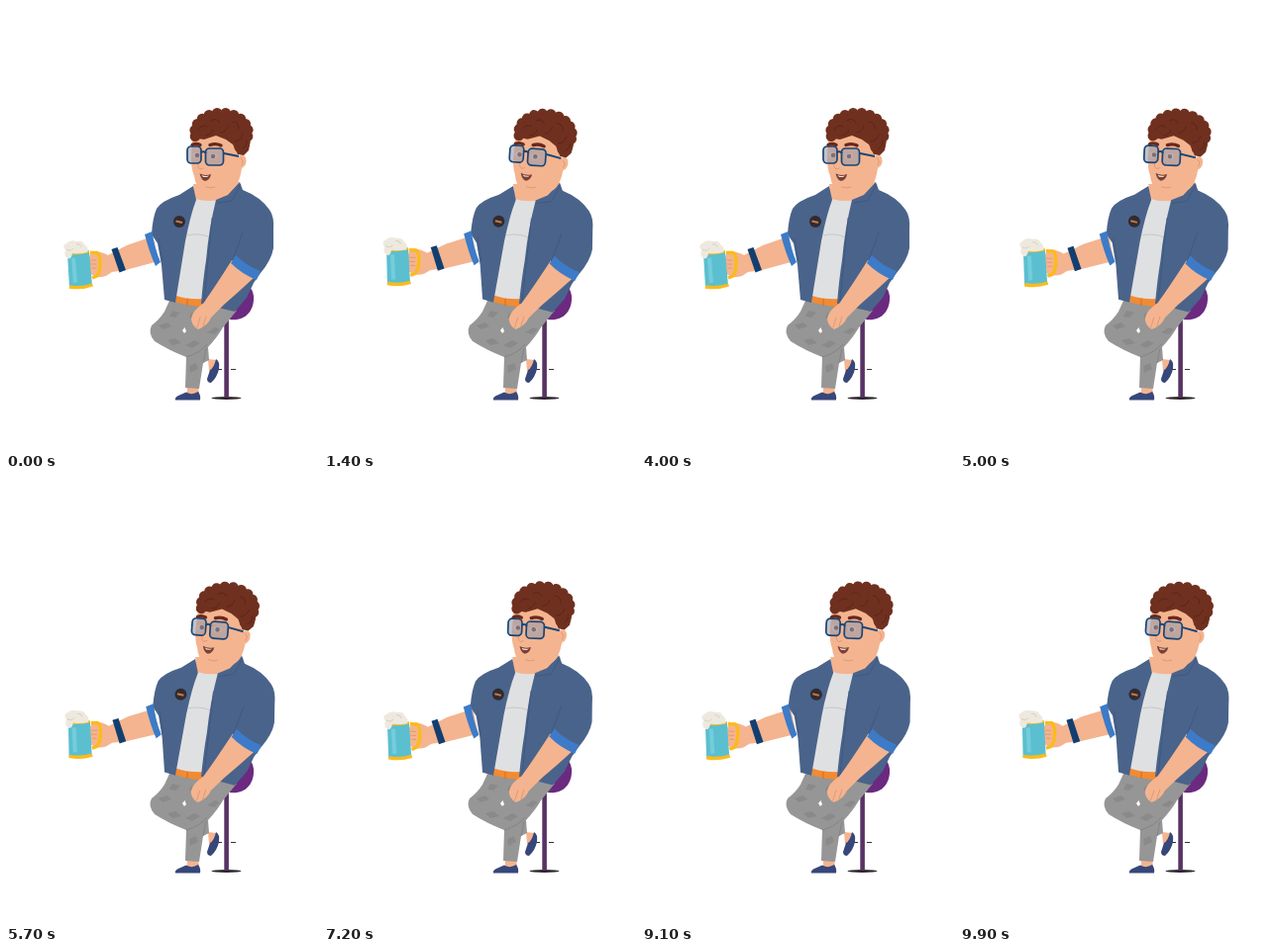
An HTML page that plays this animation: 315 px wide and 450 px high, repeating every 10000 ms.

```html
<!DOCTYPE html>
<html lang="en">
<head>
<meta charset="utf-8">
<title>Man raising a mug</title>
<style>
  html, body { margin: 0; width: 100%; height: 100%; overflow: hidden; background: #fff; }
  svg { display: block; width: 315px; height: 450px; }
  .skin { fill: #f4b48f; }
  .shade { fill: none; stroke: #d9946f; stroke-width: .8; stroke-linecap: round; }
  .denim { fill: #4a638a; }
  .seam { fill: none; stroke: #3b547d; stroke-width: .7; }
  .cuff { fill: #3d7bc8; }
  .navy { fill: #123f70; }
  .shoe { fill: #37477a; }
  .gray { fill: #969696; }
  .purple { fill: #6b2a80; }
  .hair { fill: #70301f; }
  .curl { fill: none; stroke: #572317; stroke-width: .8; stroke-linecap: round; }
  .brow { fill: none; stroke: #6a291c; stroke-width: 3.4; stroke-linecap: round; }
  .rim { fill: #a09ca8a0; stroke: #174679; stroke-width: 1.7; }
  .gold { fill: none; stroke: #fbbb1c; stroke-width: 3.4; stroke-linejoin: round; }
</style>
</head>
<body>
<svg viewBox="0 0 315 450">
  <g id="stool">
    <ellipse cx="222.500" cy="396.500" rx="15" ry="1.500" fill="#292329"/>
    <path d="M213 367.500H218M227 367.500H232" stroke="#38303a" stroke-width="1.200"/>
    <path d="M220.300 310h4.600v86h-4.600z" fill="#573263"/>
    <path class="purple" d="M226 317C241 319 251 309 250 293Q249 285 244 284L226 302Z"/>
  </g>

  <g id="legs">
    <path class="skin" d="M204 357l8 1-1 10-6 1zM183 384h11l1 8h-12z"/>
    <path class="shoe" d="M212 357Q216 359 215 367 213 376 207 381 203 381 203 377L206 368Q210 366 212 357ZM182 390.500Q188 394 194 390 197 394 196 398.500H171Q170 396 174 394Z"/>
    <path class="gray" d="M165 298L160 309Q155 317 147 323 143 331 150 339 164 348 182 355L181 386 195 387 199 361 205 358 204 345Q214 334 219 325L233 308 198 297Z"/>
    <g fill="#8a8a8a">
      <path d="M168 308l8 2-5 5-6-1zM154 323l9-3 4 4-9 3zM163 338l8-2 6 5-9 2zM181 343l9-5 6 3-8 5zM203 330l8-5 5 2-6 5zM185 364l7-3 2 6-8 4zM187 310l5 2-2 6-5-3z"/>
    </g>
    <path d="M182 355Q196 351 203 342M199 361L202 346" fill="none" stroke="#7f7f7f" stroke-width=".8"/>
    <path d="M178 328l2.500-3 1.500 4-2 2z" fill="#fff"/>
  </g>

  <g id="torso">
    <g id="arm">
      <path class="skin" d="M148 233L122 242 103 252Q95 247 86 249L83 257 85 271Q92 276 101 273L107 269 121 267 154 258Z"/>
      <path class="navy" d="M106.500 246L112.500 244 121 267 114.500 269.500Z"/>
      <path d="M62 250L84 248 87 283Q76 287 64 285Z" fill="#5bbfd0"/>
      <path d="M66 255l4-.4 2 25-4 .4z" fill="#74cdda"/>
      <path class="gold" d="M85 249.500L92 249.500Q95 251 95 260T92 273L87 275"/>
      <path class="gold" d="M64 284Q76 286 87.500 282"/>
      <path class="gold" d="M62 250Q74 251 84 248" style="stroke-width:2.400"/>
      <path class="skin" d="M85 253h6q2 2 0 4 2 2 0 4 2 2 0 4 1 3-3 5l-2 0z"/>
      <path class="shade" d="M86 257h5M86 261h5M87 265h4"/>
      <path d="M62 255Q58 252 60 247 56 242 61 240 65 236 71 238 78 237 79 241 84 244 82 249 75 251 67 250 66 257 62 255Z" fill="#eee9df"/>
      <path d="M61 246q4 3 7-1m3-4q4-1 5 3" fill="none" stroke="#d9d0c1"/>
    </g>
    <path d="M188 192L215 190 208 230 199 302 170 297 178 230Z" fill="#dfe0e1"/>
    <path d="M183 232Q195 229 206 234" fill="none" stroke="#c5c7ca"/>
    <path d="M172 293Q184 297 199 296L198 304Q182 303 170 299Z" fill="#f28a32"/>
    <path d="M183 296v7" stroke="#d36d20"/>
    <path class="skin" d="M189 180L236 178 226 193Q207 200 191 195Z"/>
    <path class="denim" d="M189 182L192 196Q186 212 181 238L171 300 160 297 157 262 153 240 147 231Q148 214 152 205 157 197 175 191Z"/>
    <path class="denim" d="M212 196L224 191 236 178 239 186Q257 193 266 206 271 213 270 226V245Q268 257 257 270L250 280 243 295 231 309 197 301Q199 276 202 257 205 224 212 196Z"/>
    <path class="seam" d="M237 180L228 197 213 199M239 229L229 257M154 235L158 258M208 214L200 299"/>
    <path class="cuff" d="M140 231L147.500 228Q150 245 156 259L151 263Q145 250 140 231Z"/>
    <path class="skin" d="M228 257L251 274Q235 289 220 302L207 315Q204 323 194 327 187 323 187 316 189 307 199 301 211 284 228 257Z"/>
    <path class="shade" d="M193 325L196 315M199 324L202 314"/>
    <path class="cuff" d="M232 252Q243 263 257 268L253 277Q238 271 227 260Z"/>
    <circle cx="175" cy="218" r="6" fill="#302b31"/>
    <path d="M171.500 217.500l6.500 1.500" stroke="#cb7844" stroke-width="2"/>

    <g id="head">
      <path class="skin" d="M188 133L187 155Q187 165 190 172 191 183 200 187 217 192 230 184 236 179 238 164 244 161 242 153 239 149 235 152L234 132 210 125Z"/>
      <path class="shade" d="M237 154q4 2 1 7M195 157q-3 5 1 8l3-1M202 183q5 2 9 0"/>
      <path d="M195.500 169.500Q201 172 207 170 206 176 201 177 197 176 195.500 169.500Z" fill="#7a4033"/>
      <path d="M197.500 171Q201 172.500 205 171.500L203 173 199 173Z" fill="#f3e6df"/>
      <g id="curls" class="hair"></g>
      <path class="hair" d="M187 133Q190 116 203 109 224 103 239 114 250 127 245 146L240 151 234 150 229 140 222 135 212 131 200 135Z"/>
      <path class="curl" d="M194 125q4-6 9-3M207 116q5-4 9 2M217 128q6-1 7-7M229 117q6 0 6 7M231 137q6 0 8-7M202 131q5 0 7-6M239 144q5-3 4-8"/>
      <path class="brow" d="M188 140.500Q192 138.500 196 140.500M206 140.500Q212 138.500 217 141"/>
      <ellipse cx="192" cy="151" rx="3.500" ry="2.800" fill="#e9d9d3"/>
      <ellipse cx="209" cy="152" rx="4" ry="2.800" fill="#e9d9d3"/>
      <circle cx="193" cy="151" r="2.300" fill="#4b2220"/>
      <circle cx="209" cy="152" r="2.300" fill="#4b2220"/>
      <rect class="rim" x="183" y="142" width="14" height="17" rx="4"/>
      <rect class="rim" x="201.500" y="144" width="18" height="17" rx="4"/>
      <path d="M197 148q3-2 5 1M220 149L235 152" fill="none" stroke="#174679" stroke-width="2"/>
    </g>
  </g>
</svg>
<script>
const el = id => document.getElementById(id);
const rotate = (id, degrees, x, y, shift = 0) =>
  el(id).setAttribute("transform", `translate(${shift} 0) rotate(${degrees} ${x} ${y})`);

// Curls around the rim of the hair.
for (let i = 0; i < 14; i++) {
  const angle = 2.95 + i * .32;
  const curl = document.createElementNS("http://www.w3.org/2000/svg", "circle");
  curl.setAttribute("cx", 217.5 + 27 * Math.cos(angle));
  curl.setAttribute("cy", 128 + 20 * Math.sin(angle));
  curl.setAttribute("r", 5.3);
  el("curls").append(curl);
}

const LOOP = 10000, STEP = 100, DURATION = 1150;
const turns = [720, 2720, 4620, 6520, 8720]; // alternately lean back, return
const smooth = x => x * x * (3 - 2 * x);

function leanAt(time) {
  const i = turns.findLastIndex(start => time >= start);
  if (i < 0) return 0;
  const x = Math.min(1, (time - turns[i]) / DURATION);
  return i % 2 ? 1 - smooth(x ** 1.6) : smooth(1 - (1 - x) ** 2.2);
}

function draw() {
  const lean = leanAt(Math.floor(performance.now() % LOOP / STEP) * STEP);
  rotate("torso", lean, 190, 300);
  rotate("head", 3.2 * lean, 211, 188);
  rotate("arm", lean, 148, 245, 6 * lean * (1 - lean));
  requestAnimationFrame(draw);
}
draw();
</script>
</body>
</html>
```
